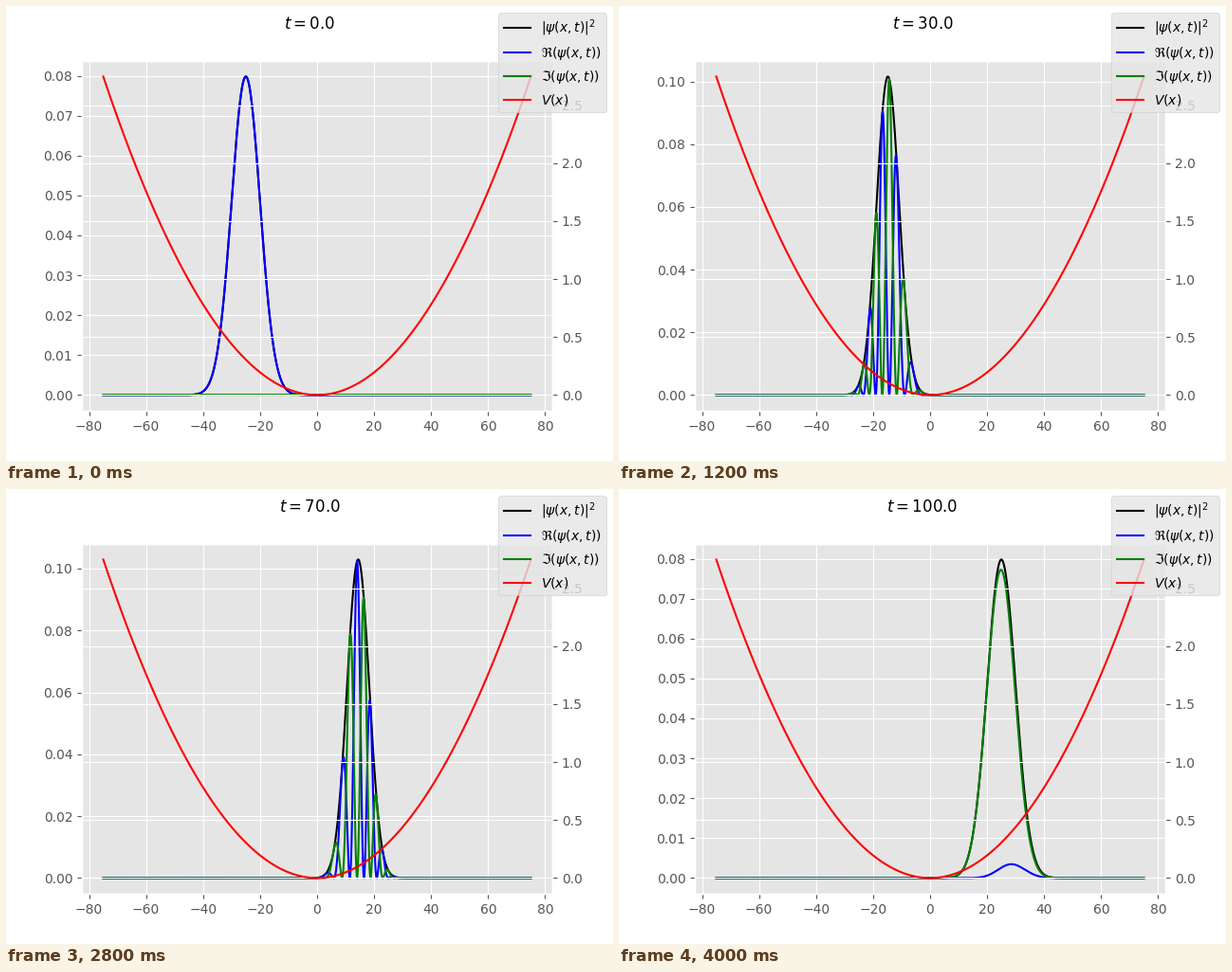
Recreate the animation shown at these times as a matplotlib script. Size 640 by 480 pixels, loop 4040 ms.

```python
"""Gaussian wave packet swinging in a harmonic well."""
import numpy as np
import matplotlib.pyplot as plt
from matplotlib.animation import FuncAnimation

N = 1000
HALF = 75
X0, SIGMA = -25, 5
OMEGA = 1 / 32
FRAMES, INTERVAL = 101, 40

x = np.linspace(-HALF, HALF, N)
dx = x[1] - x[0]
V = 0.5 * (OMEGA * x) ** 2

# Finite-difference Hamiltonian (hbar = m = 1) and its eigenbasis
hop = np.full(N - 1, -0.5 / dx**2)
H = np.diag(V + 1 / dx**2) + np.diag(hop, 1) + np.diag(hop, -1)
energy, modes = np.linalg.eigh(H)

psi0 = np.exp(-((x - X0) ** 2) / (4 * SIGMA**2)) / (2 * np.pi * SIGMA**2) ** 0.25
coeffs = modes.T @ psi0


def psi_at(t):
    phase = energy * t
    return modes @ (coeffs * np.cos(phase)) - 1j * (modes @ (coeffs * np.sin(phase)))


plt.style.use("ggplot")
fig, ax = plt.subplots(figsize=(6.4, 4.8), dpi=100)
title = fig.suptitle("$t = 0.0$")

labels = (r"$|\psi(x,t)|^2$", r"$\Re(\psi(x,t))$", r"$\Im(\psi(x,t))$")
curves = [
    ax.plot(x, psi0**2, color=color, label=label)[0]
    for color, label in zip(("black", "blue", "green"), labels)
]
well = ax.twinx()
well.plot(x, V, color="red", label="$V(x)$")
fig.legend()


def update(frame):
    t = float(frame)
    psi = psi_at(t)
    density = np.abs(psi) ** 2
    for curve, y in zip(curves, (density, psi.real**2, psi.imag**2)):
        curve.set_ydata(y)
    peak = density.max()
    ax.set_ylim(-0.05 * peak, 1.05 * peak)
    title.set_text(f"$t = {t:.1f}$")
    return [*curves, title]


anim = FuncAnimation(fig, update, frames=FRAMES, interval=INTERVAL,
                     repeat=True, repeat_delay=0, blit=False)
plt.show()
```
